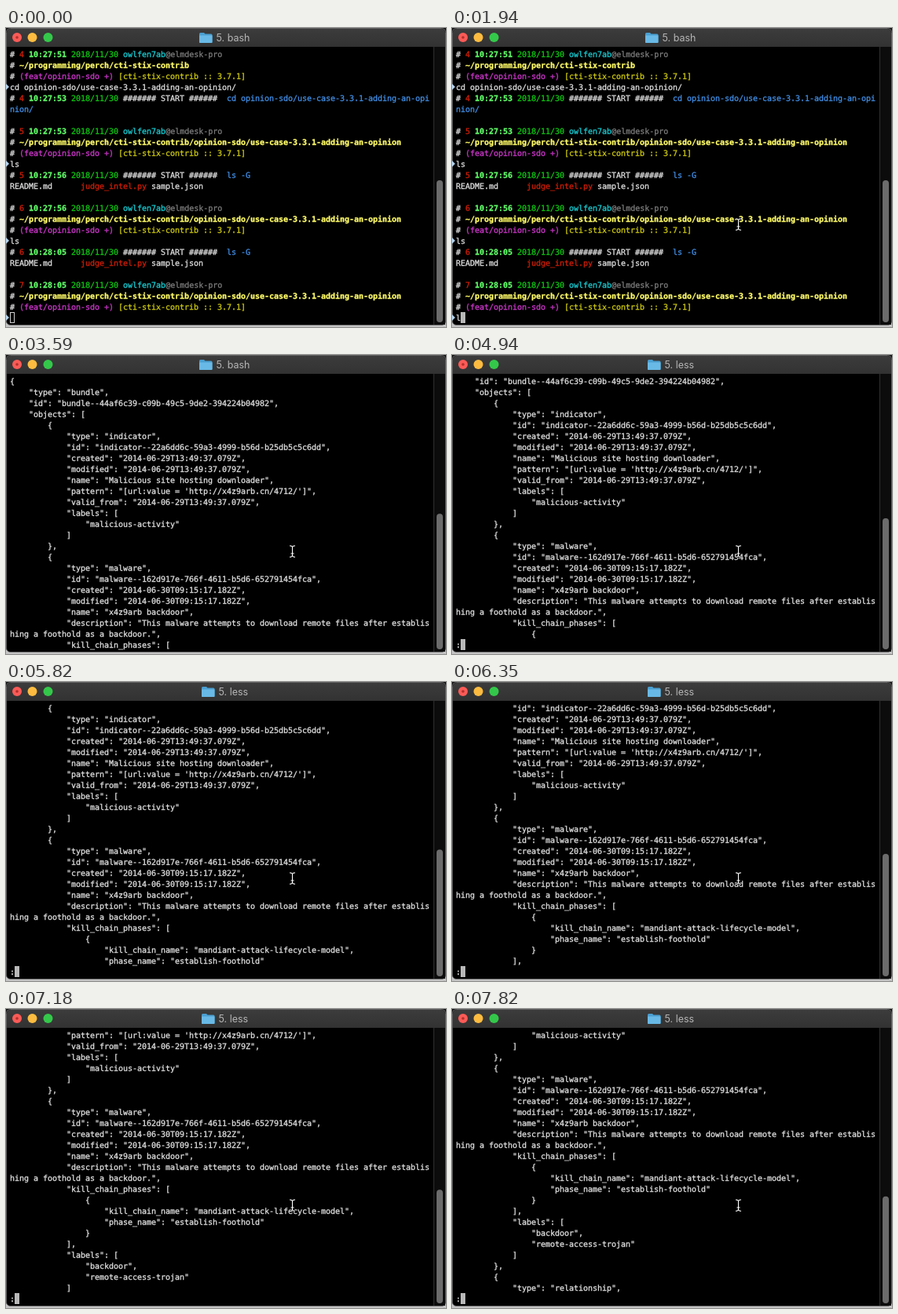
Write an HTML page that moves like this. It is 560 by 381 pixels and loops after 8000 ms.

```html
<!DOCTYPE html>
<html lang="en">
<head>
<meta charset="utf-8">
<title>Terminal</title>
<style>
html, body { margin: 0; width: 100%; height: 100%; overflow: hidden; background: #161616; }
svg { display: block; }
#rows text {
  font: 10px "DejaVu Sans Mono", monospace; letter-spacing: -.0205px;
  white-space: pre; text-rendering: geometricPrecision; color: #e0e0e0;
}
#rows text, #rows tspan { fill: currentColor; stroke: currentColor; stroke-width: .3px; }
#title text { font: 12.5px Inter, sans-serif; fill: #b6b6b6; }
.b { font-weight: bold; }
.r { color: #cf1e06; } .g { color: #10c814; } .G { color: #5ff967; }
.y { color: #cfcb10; } .Y { color: #fefb67; } .m { color: #cf36cd; }
.c { color: #18cdd4; } .u { color: #428fe6; } .d { color: #7c7c7c; }
</style>
</head>
<body>
<svg width="560" height="381" viewBox="0 0 560 381">
  <defs>
    <linearGradient id="bar" x2="0" y2="1">
      <stop stop-color="#3c3c3c"/><stop offset="1" stop-color="#323232"/>
    </linearGradient>
  </defs>
  <rect y="372" width="560" height="9" fill="#c4c4c4"/>
  <rect x=".5" y=".5" width="559" height="378" rx="5" stroke="#626262"/>
  <path d="M1 24V6Q1 1 6 1H554Q559 1 559 6V24Z" fill="url(#bar)"/>
  <rect x="545" y="24" width="14" height="354" fill="#0c0c0c"/>
  <path d="M544.5 24V378" stroke="#303030"/>
  <circle cx="14" cy="12" r="6" fill="#fc5b57"/>
  <circle cx="14" cy="12" r="1.8" fill="#b0312c"/>
  <circle cx="33.5" cy="12" r="6" fill="#fdbc40"/>
  <circle cx="53.5" cy="12" r="6" fill="#34c84a"/>
  <g id="title">
    <path d="M246 7.5Q246 6 247.5 6H252L253.5 7.5H261Q262.5 7.5 262.5 9V18Q262.5 19 261.5 19H247Q246 19 246 18Z" fill="#4a9fd0"/>
    <path d="M246 9.5H262.5V18Q262.5 19 261.5 19H247Q246 19 246 18Z" fill="#69b9e6"/>
    <text x="267.5" y="17"></text>
  </g>
  <g id="rows"></g>
  <rect id="thumb" x="548" width="8" rx="4" fill="#6c6c6c"/>
  <path id="arrow" d="M364 249V263L367.3 260.2L369.5 265.3L371.7 264.3L369.5 259.4H373.5Z" stroke="#fff"/>
  <g id="beam" fill="none">
    <path stroke="#000" stroke-width="2.6"/>
    <path stroke="#fff" stroke-width="1.1"/>
  </g>
</svg>
<script>
const $ = id => document.getElementById(id);
const LOOP = 8000, COLS = 89, ROWS = 25;
const keyTimes = [1940, 2000, 2240, 2350, 2470, 2650, 2710];
const scrollTimes = [3650, 4940, 5470, 5820, 6060, 6290, 6530, 6760, 6940, 7180, 7410, 7590, 7820];

// Shell session
const span = (cls, s) => `<tspan class="${cls}">${s}</tspan>`;
const stamp = (n, time) => `# ${span("r", n)} ${span("G b", time)} ${span("g", "2018/11/30")} `;
const useCase = "opinion-sdo/use-case-3.3.1-adding-an-opinion";
const prompt = (n, time, dir = "/" + useCase) => [
  stamp(n, time) + span("c", "owlfen7ab") + span("d", "@elmdesk-pro"),
  "# " + span("Y b", "~/programming/perch/cti-stix-contrib" + dir),
  `# ${span("m", "(feat/opinion-sdo +)")} ${span("y", "[cti-stix-contrib :: 3.7.1]")}`
];
const start = (n, time, cmd) => stamp(n, time) + "####### START ######  " + span("u", cmd);
const list = (n, time) => [
  "ls", start(n, time, "ls -G"),
  `README.md      ${span("r", "judge_intel.py")} sample.json`, ""
];
const cd = `cd ${useCase}/`;
const shell = [
  ...prompt(4, "10:27:51", ""),
  cd, start(4, "10:27:53", cd.slice(0, 43)), span("u", cd.slice(43)), "",
  ...prompt(5, "10:27:53"), ...list(5, "10:27:56"),
  ...prompt(6, "10:27:56"), ...list(6, "10:28:05"),
  ...prompt(7, "10:28:05")
];

// File shown in the pager
const dates = s => ({ created: s, modified: s });
const seen = "2014-06-29T13:49:37.079Z";
const file = JSON.stringify({
  type: "bundle",
  id: "bundle--44af6c39-c09b-49c5-9de2-394224b04982",
  objects: [{
    type: "indicator",
    id: "indicator--22a6dd6c-59a3-4999-b56d-b25db5c5c6dd",
    ...dates(seen),
    name: "Malicious site hosting downloader",
    pattern: "[url:value = 'http://x4z9arb.cn/4712/']",
    valid_from: seen,
    labels: ["malicious-activity"]
  }, {
    type: "malware",
    id: "malware--162d917e-766f-4611-b5d6-652791454fca",
    ...dates("2014-06-30T09:15:17.182Z"),
    name: "x4z9arb backdoor",
    description: "This malware attempts to download remote files after establishing a foothold as a backdoor.",
    kill_chain_phases: [{
      kill_chain_name: "mandiant-attack-lifecycle-model",
      phase_name: "establish-foothold"
    }],
    labels: ["backdoor", "remote-access-trojan"]
  }, { type: "relationship", id: "" }]
}, null, 4).split("\n").flatMap(s => s.match(new RegExp(`.{1,${COLS}}`, "g")));

const drawRows = lines => lines.map((s, i) => `<text x="5" y="${37 + 14 * i}">${s}</text>`).join("");
const mark = row => `<path d="M0 ${29 + 14 * row}l4 4l-4 4Z" fill="#b4d4ee"/>`;
const cursor = (col, hollow) => hollow
  ? `<rect x="${5.5 + 6 * col}" y="362.5" width="5" height="13" fill="none" stroke="#d0d0d0"/>`
  : `<rect x="${5 + 6 * col}" y="362" width="6" height="14" fill="#b8b8b8"/>`;
const passed = (times, t) => times.filter(x => t >= x).length;

function screen(t) {
  if (t < 3590) {
    const typed = t >= 3240 ? "less sample.json " : "less sa".slice(0, passed(keyTimes, t));
    return drawRows([...shell, typed]) + [3, 10, 17, 24].map(mark).join("") + cursor(typed.length, t < 60);
  }
  const top = passed(scrollTimes, t);
  if (!top) return drawRows(file.slice(0, ROWS));
  return drawRows([...file.slice(top, top + ROWS - 1), ":"]) + cursor(1);
}

let shown;
function frame() {
  const t = performance.now() % LOOP;
  const html = screen(t);
  if (html !== shown) $("rows").innerHTML = shown = html;

  const less = t >= 4240;
  $("title").setAttribute("transform", `translate(${less ? 3 : 0})`);
  $("title").querySelector("text").textContent = less ? "5. less" : "5. bash";

  const y = t < 3590 ? 194 : 202.3 + 2.8 * passed(scrollTimes, t);
  $("thumb").setAttribute("y", y);
  $("thumb").setAttribute("height", 375 - y);

  $("arrow").style.display = t >= 240 && t < 290 ? "" : "none";
  $("beam").style.display = t >= 290 ? "" : "none";
  requestAnimationFrame(frame);
}

const half = x => `M${x} 243Q364.5 243 364.5 245.5V255Q364.5 257.5 ${x} 257.5`;
for (const p of $("beam").children) p.setAttribute("d", half(361) + half(368) + "M362.5 253H366.5");
frame();
</script>
</body>
</html>
```
